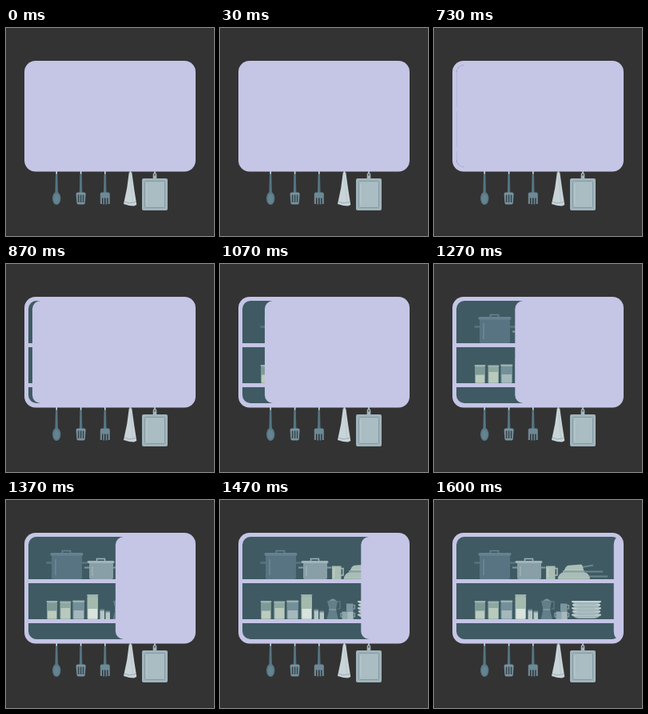
These frames come from a looping animation (260 by 260 pixels, 4010 ms). An HTML page:

```html
<!DOCTYPE html>
<html lang="en">
<head>
<meta charset="utf-8">
<title>Kitchen cabinet</title>
<style>
  html, body { margin: 0; width: 100%; height: 100%; overflow: hidden; background: #333; }
  svg { display: block; width: 100vw; height: 100vh; }
</style>
</head>
<body>
<svg viewBox="0 0 260 260">
  <defs>
    <clipPath id="inside"><rect x="28" y="46" width="205" height="128" rx="10"/></clipPath>
    <g id="handle">
      <path d="M0 178V183" stroke="#d3dce4" stroke-width="1.6"/>
      <path d="M-1.2 182.5H1.2L1.8 206H-1.8Z" fill="#507180"/>
      <path d="M-.5 184V205" stroke="#628391" stroke-width=".6"/>
    </g>
  </defs>
  <rect width="260" height="260" fill="#333"/>

  <g id="utensils">
    <g transform="translate(63.2 0)">
      <use href="#handle"/>
      <ellipse cy="213" rx="5.2" ry="8" fill="#587887"/>
      <ellipse cy="213.5" rx="3.5" ry="6" fill="#648491"/>
    </g>
    <g transform="translate(93.6 0)">
      <use href="#handle"/>
      <path d="M-4 205.5H4Q6 205.5 6 207.5L5.2 218.5Q5 220.5 3.5 220.5H-3.5Q-5 220.5-5.2 218.5L-6 207.5Q-6 205.5-4 205.5Z" fill="#7893a0"/>
      <path d="M-3 208.5V218M0 208.5V218M3 208.5V218" stroke="#38444a" stroke-width="1.6"/>
    </g>
    <g transform="translate(123.8 0)">
      <use href="#handle"/>
      <path d="M-4 205.5H4Q6 205.5 6 207.5V220H3.8V212.5H2.4V220.5H.8V212.5H-.8V220.5H-2.4V212.5H-3.8V220H-6V207.5Q-6 205.5-4 205.5Z" fill="#6c8997"/>
    </g>
    <path d="M155.5 178V182" stroke="#d3dce4" stroke-width="1.6"/>
    <path d="M153.8 180.5H157.3Q160 201 163.3 221L160 222.5L154 222L150.5 221L147 220Q152 200 153.8 180.5Z" fill="#c9d4d8"/>
    <path d="M156 186L158.5 217" stroke="#b3c2c8" stroke-width=".7" fill="none"/>
    <path d="M148.3 217L154 219L162.5 217.5" stroke="#8fa3ab" stroke-width=".8" fill="none"/>
    <path d="M186 178V182" stroke="#d3dce4" stroke-width="1.5"/>
    <rect x="183.7" y="181" width="4.6" height="9" rx="2" fill="#a3b5bb"/>
    <circle cx="186" cy="183.5" r="1" fill="#3c484d"/>
    <rect x="170" y="188" width="32" height="40" rx="2" fill="#a1b4bb"/>
    <rect x="173.5" y="191.5" width="25" height="33" rx="1" fill="#a9bdc2" stroke="#7f969f" stroke-width=".9"/>
    <path d="M176 195V221" stroke="#c0cfd2" stroke-width=".8"/>
  </g>

  <rect x="23" y="41" width="214" height="138.5" rx="14" fill="#c5c5e6"/>

  <g id="cabinet" clip-path="url(#inside)">
    <rect x="28" y="46" width="205" height="128" fill="#3f5a63"/>
    <g fill="#c5c5e6">
      <rect x="28" y="99" width="205" height="5"/>
      <rect x="28" y="149" width="205" height="5"/>
    </g>

    <g id="pots">
      <path d="M50.5 78.5H57M95 78.5H101.5" stroke="#587482" stroke-width="2.6"/>
      <path d="M57 69H95V97Q95 99 92 99H60Q57 99 57 97Z" fill="#587482"/>
      <rect x="55.5" y="66" width="41" height="3.4" rx="1.5" fill="#668290"/>
      <path d="M70.5 66.5V63.5H80.5V66.5" fill="none" stroke="#668290" stroke-width="1.7"/>
      <path d="M62 74V94" stroke="#6c8996" stroke-width="1.6"/>
      <path d="M98 84.5H104M134 84.5H139.5" stroke="#8199a1" stroke-width="2.2"/>
      <path d="M104 78H134V97Q134 99 132 99H106Q104 99 104 97Z" fill="#899fa7"/>
      <rect x="101.5" y="76" width="34" height="3" rx="1.5" fill="#a1b4b9"/>
      <path d="M113.5 76.5V73.5H123.5V76.5" fill="none" stroke="#a1b4b9" stroke-width="1.4"/>
      <path d="M108 83V95" stroke="#a1b4b9" stroke-width="1.4"/>
    </g>

    <path d="M151 85.5H154V94H151" fill="none" stroke="#a9bdb4" stroke-width="1.5"/>
    <path d="M140 82.5H151.5V99H140Z" fill="#a9bdb4"/>
    <path d="M142.5 85V97" stroke="#bfcfc4" stroke-width="1.5"/>

    <g id="pans">
      <path d="M185 84L199 81.5M187 89.5H211M193 95.5H217" stroke="#6a858d" stroke-width="2"/>
      <path d="M168 81.8L184 80.5Q186 81 187 88H163Q164 83 168 81.8Z" fill="#aabeb5"/>
      <path d="M161 88H188V91H161Z" fill="#8aa1a3"/>
      <path d="M161 90.5H189Q194 92 195 98.5H154.5Q156 92 161 90.5Z" fill="#a9bdb7"/>
      <path d="M163 87.5H187M155 98H194.5" stroke="#bccbc3" stroke-width="1.1"/>
    </g>

    <g id="jars"></g>

    <g id="shakers">
      <path d="M117.5 138H123V149H117.5ZM124.5 140H130V149H124.5Z" fill="#b4c6c3"/>
      <path d="M117.5 137.5H123M124.5 139.5H130" stroke="#708c94" stroke-width="2"/>
    </g>
    <g id="moka">
      <path d="M147 127H150V136H147" fill="none" stroke="#59747e" stroke-width="1.5"/>
      <path d="M134 126H147L145 137L148 149H133.5L136.5 137Z" fill="#637f8a"/>
      <path d="M136 126L140 123.5H142L146 126Z" fill="#78939b"/>
      <path d="M136 137H145.5" stroke="#829ca3" stroke-width="1.4"/>
    </g>
    <g id="cups">
      <path d="M166 131.5H168.5V136H166M166 141.5H168.5V146H166M153 141.5H151V146H153" fill="none" stroke="#8aa1a9" stroke-width="1.2"/>
      <path d="M158 129.5H166.5V139H158Z" fill="#7d959e"/>
      <path d="M152.5 139.5H166.5V149H152.5Z" fill="#8da5ad"/>
      <path d="M159.5 139.5H166.5V149H159.5Z" fill="#a6b9bd"/>
    </g>

    <g id="plates"></g>
  </g>
  <rect id="door" y="46" height="128" rx="10" fill="#c5c5e6"/>
</svg>
<script>
const LOOP = 4010, FRAME = 100 / 3, OPEN_START = 730, DOOR_RIGHT = 236;
const door = document.getElementById('door');

function add(parent, tag, attrs) {
  const el = document.createElementNS('http://www.w3.org/2000/svg', tag);
  for (const name in attrs) el.setAttribute(name, attrs[name]);
  document.getElementById(parent).append(el);
}

function jar(x, y, width, level, glass, filling) {
  add('jars', 'rect', { x, y: y + 2, width, height: 147 - y, rx: 1.5, fill: glass });
  add('jars', 'rect', { x: x + 1, y: level, width: width - 2, height: 148.5 - level, fill: filling });
  add('jars', 'rect', { x: x - .3, y, width: width + .6, height: 2.4, rx: .8, fill: '#9db1ae' });
}
jar(51, 126, 13, 138.5, '#7e9a97', '#bccbbd');
jar(67.5, 126.5, 13.5, 135, '#8da8a0', '#b9cabd');
jar(83.5, 125.5, 14.5, 138, '#73909a', '#a5b9bc');
jar(101.5, 118, 13.5, 136, '#a3baad', '#d9e3dd');

for (let i = 0; i < 5; i++) {
  const y = 143 - i * 4.1, inset = i % 2 * .8;
  add('plates', 'path', {
    d: `M${172 + inset} ${y}H${209 - inset}Q206 ${y + 4.5} 200 ${y + 5}H181Q175 ${y + 4.5} ${172 + inset} ${y}Z`,
    fill: '#a3b7ba'
  });
  add('plates', 'rect', { x: 172 + inset, y: y - .6, width: 37 - 2 * inset, height: 2, rx: 1, fill: '#c5d3d3' });
}

// time in ms, left edge of the door
const slide = [
  [733, 28.1], [800, 30], [867, 33], [967, 42.5], [1067, 56], [1167, 76.5],
  [1233, 91.5], [1267, 101.4], [1367, 137], [1467, 176.4], [1533, 202.5], [1600, 224.7]
];

function doorEdge(time) {
  const next = slide.findIndex(step => step[0] > time);
  if (next < 0) return slide.at(-1)[1];
  if (next === 0) return slide[0][1];
  const [t0, x0] = slide[next - 1], [t1, x1] = slide[next];
  return x0 + (x1 - x0) * (time - t0) / (t1 - t0);
}

function draw() {
  const time = performance.now() % LOOP;
  const tick = Math.floor((time + 4) / FRAME) * FRAME;
  const closed = time < OPEN_START;
  const x = closed ? 24 : doorEdge(tick);
  door.setAttribute('x', x);
  door.setAttribute('width', DOOR_RIGHT - x);
  document.getElementById('cabinet').style.visibility = closed ? 'hidden' : 'visible';
  requestAnimationFrame(draw);
}
draw();
</script>
</body>
</html>
```
